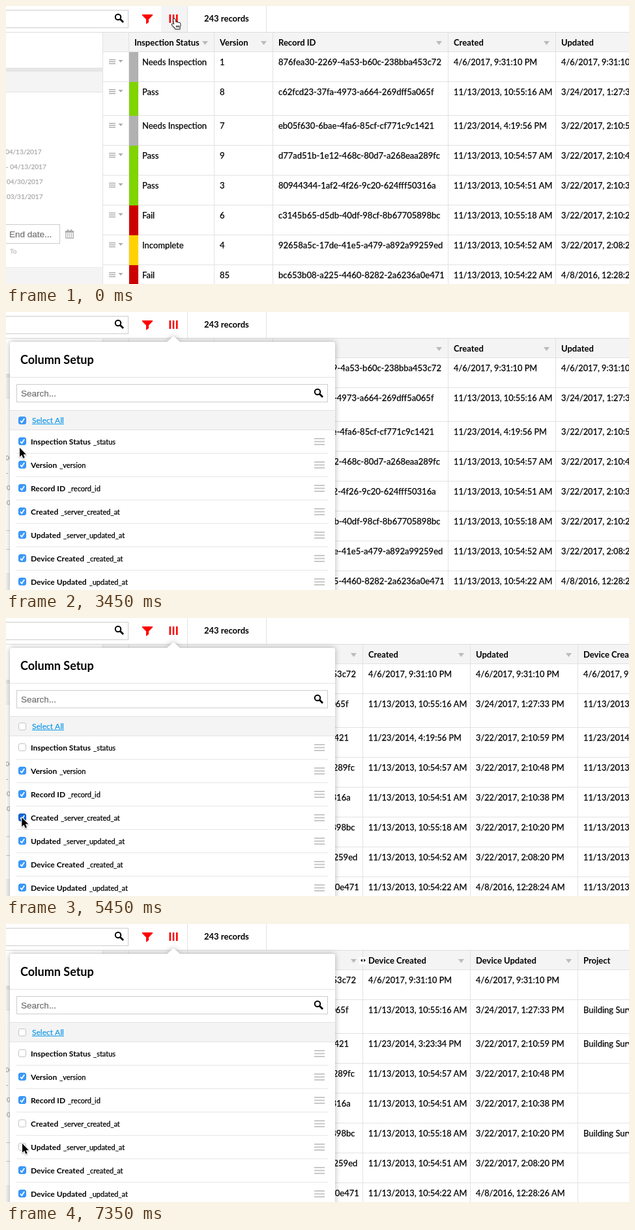
An HTML page with a canvas for the animation above (8 s loop, 956 px wide and 428 px high).

```html
<!DOCTYPE html>
<html lang="en">
<head>
<meta charset="utf-8">
<title>Column setup</title>
<style>
html, body { margin: 0; width: 100%; height: 100%; overflow: hidden; background: #fff; }
canvas { display: block; }
</style>
</head>
<body>
<canvas id="stage" width="956" height="428"></canvas>
<script>
const ctx = document.getElementById('stage').getContext('2d');
const LOOP = 8000, STEP = 118.4;
const LATO = 'Lato, sans-serif', ARIAL = '"Liberation Sans", sans-serif';
const RED = '#f00', LINE = '#e2e2e2', PALE = '#f4f4f4';
const DATE_SIZE = 12.75;

// Table data
const GREY = '#b1b1b1', GREEN = '#80d400', FAIL = '#cc0000', YELLOW = '#ffd200';
const statusColor = { 'Needs Inspection': GREY, Pass: GREEN, Fail: FAIL, Incomplete: YELLOW };
const rowTops = [70, 116, 168, 214, 260, 306, 352, 398];
const pm = '4/6/2017, 9:31:10 PM';
const morning = times => times.split(' ').map(s => `11/13/2013, 10:${s} AM`);
const [a, b, c, d, e, f, g] = morning('55:16 54:57 54:51 55:18 54:52 54:22 54:51');
const updated = [pm, '3/24/2017, 1:27:33 PM', ...['10:59', '10:48', '10:38', '10:20', '08:20']
  .map(s => `3/22/2017, 2:${s} PM`)];
const columns = [
  { name: 'Inspection Status', key: '_status', width: 131, off: 3920,
    cells: ['Needs Inspection', 'Pass', 'Needs Inspection', 'Pass', 'Pass', 'Fail', 'Incomplete', 'Fail'] },
  { name: 'Version', key: '_version', width: 90, cells: ['1', '8', '7', '9', '3', '6', '4', '85'] },
  { name: 'Record ID', key: '_record_id', width: 269, cells: [
    '876fea30-2269-4a53-b60c-238bba453c72', 'c62fcd23-37fa-4973-a664-269dff5a065f',
    'eb05f630-6bae-4fa6-85cf-cf771c9c1421', 'd77ad51b-1e12-468c-80d7-a268eaa289fc',
    '80944344-1af2-4f26-9c20-624fff50316a', 'c3145b65-d5db-40df-98cf-8b67705898bc',
    '92658a5c-17de-41e5-a479-a892a99259ed', 'bc653b08-a225-4460-8282-2a6236a0e471'] },
  { name: 'Created', key: '_server_created_at', width: 165, press: 5450, off: 5570,
    cells: [pm, a, '11/23/2014, 4:19:56 PM', b, c, d, e, f] },
  { name: 'Updated', key: '_server_updated_at', width: 165, press: 7110, off: 7350,
    cells: [...updated, '4/8/2016, 12:28:24 AM'] },
  { name: 'Device Created', key: '_created_at', width: 165,
    cells: [pm, a, '11/23/2014, 3:23:34 PM', b, c, d, g, f] },
  { name: 'Device Updated', key: '_updated_at', width: 165,
    cells: [...updated, '4/8/2016, 12:28:26 AM'] },
  { name: 'Project', width: 165,
    cells: ['', 'Building Survey', 'Building Survey', '', '', 'Building Survey', '', ''] }
];

// Cursor moves: start, number of steps, quadratic path
const moves = [
  { at: 1920, steps: 7, path: [261, 20, 285, 45, 56, 158] },
  { at: 2740, steps: 7, path: [56, 158, 24, 240, 21, 209] },
  { at: 4280, steps: 7, path: [21, 209, 30, 250, 24, 297] },
  { at: 5100, steps: 4, path: [24, 297, 25, 303, 24, 309] },
  { at: 6520, steps: 6, path: [24, 309, 24, 324, 25, 338] }
];

function rect(x, y, w, h, color) {
  ctx.fillStyle = color;
  ctx.fillRect(x, y, w, h);
}

function box(x, y, w, h, color) {
  ctx.strokeStyle = color;
  ctx.lineWidth = 1;
  ctx.strokeRect(x + .5, y + .5, w - 1, h - 1);
}

// The hairline outline gives the text its slightly heavier smoothing
function text(str, x, y, size = 13, color = '#000', weight = 400, family = LATO) {
  ctx.font = `${weight} ${size}px ${family}`;
  ctx.fillStyle = ctx.strokeStyle = color;
  ctx.lineWidth = .25;
  ctx.fillText(str, x, y);
  if (weight === 400) ctx.strokeText(str, x, y);
  return ctx.measureText(str).width;
}

const bold = (str, x, y, size = 13) => text(str, x, y, size, '#000', 700);

function poly(points, color) {
  ctx.beginPath();
  for (let i = 0; i < points.length; i += 2) ctx.lineTo(points[i], points[i + 1]);
  ctx.closePath();
  ctx.fillStyle = color;
  ctx.fill();
}

const caret = (x, y, w, h, color) => poly([x, y, x + w, y, x + w / 2, y + h], color);

function bars(x, y, w, h, gap, color) {
  for (let i = 0; i < 3; i++) rect(x, y + i * gap, w, h, color);
}

function magnifier(x, y) {
  ctx.strokeStyle = '#000';
  ctx.lineWidth = 2;
  ctx.beginPath();
  ctx.arc(x - 2, y - 2, 4.2, 0, 7);
  ctx.stroke();
  ctx.lineWidth = 2.8;
  ctx.beginPath();
  ctx.moveTo(x + 1.5, y + 1.5);
  ctx.lineTo(x + 6, y + 6);
  ctx.stroke();
}

function toolbar(t) {
  rect(0, 0, 956, 40, '#fff');
  if (t < 2040) rect(238, 0, 40, 40, PALE);
  rect(0, 40, 956, 1, '#dcdcdc');
  box(-5, 6, 193, 28, '#ccc');
  magnifier(174, 19);
  poly([209, 13, 225, 13, 225, 14.5, 219, 20.5, 219, 25, 215, 28, 215, 20.5, 209, 14.5], RED);
  for (const x of [250.5, 255.75, 261]) rect(x, 13, 2.5, 13, RED);
  rect(278, 0, 1, 40, LINE);
  rect(399, 0, 1, 40, LINE);
  bold('243 records', 304, 24);
}

function sidebar() {
  rect(0, 95, 148, 6, '#e6e6e6');
  rect(0, 101, 148, 31, PALE);
  rect(0, 132, 148, 1, LINE);
  const dim = '#a8a8a8';
  text('04/13/2017', -1, 228, 10, dim);
  text('- 04/13/2017', 0, 251, 10, dim);
  text('04/30/2017', 1, 274, 10, dim);
  text('03/31/2017', 1, 297, 10, dim);
  box(-5, 336, 88, 30, '#ccc');
  text('End date...', 5, 356, 13.5, '#757575', 400, ARIAL);
  text('To', 6, 381, 10, '#bbb');
  box(91, 346, 13, 12, '#aaa');
  rect(91, 346, 13, 3, '#aaa');
  rect(94, 344, 2, 3, '#aaa');
  rect(99, 344, 2, 3, '#aaa');
  for (let i = 0; i < 9; i++) rect(93 + i % 3 * 3.3, 350 + (i / 3 | 0) * 2.5, 2.4, 1.6, '#bbb');
  rect(0, 402, 148, 26, PALE);
  rect(0, 402, 148, 1, '#ececec');
}

function table(t) {
  rect(148, 41, 808, 29, PALE);
  for (const y of rowTops) {
    rect(148, y, 808, 1, LINE);
    bars(158, y + 12, 10, 1.4, 3, '#aaa');
    caret(172.5, y + 13, 7, 4, '#aaa');
  }
  rect(148, 41, 1, 387, LINE);
  let x = 188;
  for (const col of columns) {
    if (t >= col.off) continue;
    rect(x, 41, 1, 387, LINE);
    bold(col.name, x + 9, 61);
    caret(x + col.width - 18, 54, 9, 6, '#bbb');
    col.cells.forEach((cell, i) => {
      const y = rowTops[i], color = statusColor[cell];
      if (color) rect(x + 1, y + 1, 14, (rowTops[i + 1] || 444) - y, color);
      text(cell, x + (color ? 21 : 9), y + 21, cell.includes('/') ? DATE_SIZE : 13);
    });
    x += col.width;
  }
  if (t >= 5570) {
    rect(542, 51, 11, 11, '#fff');
    poly([547, 53.5, 547, 58.5, 544, 56], '#000');
    poly([549, 53.5, 549, 58.5, 552, 56], '#000');
  }
}

function checkbox(y, checked, pressed) {
  ctx.beginPath();
  ctx.roundRect(19.5, y - 5.5, 11, 11, 2.5);
  ctx.lineWidth = 1;
  ctx.fillStyle = checked ? (pressed ? '#1268d6' : '#3b99fc') : '#fff';
  ctx.strokeStyle = checked ? (pressed ? '#0d57b8' : '#318ff0') : '#c4c4c4';
  ctx.fill();
  ctx.stroke();
  if (!checked) return;
  ctx.beginPath();
  ctx.moveTo(22, y + .5);
  ctx.lineTo(24.2, y + 3);
  ctx.lineTo(28.2, y - 3);
  ctx.strokeStyle = '#fff';
  ctx.lineWidth = 1.7;
  ctx.stroke();
}

function popup(t) {
  ctx.save();
  ctx.shadowColor = 'rgba(0,0,0,.3)';
  ctx.shadowBlur = 9;
  ctx.beginPath();
  ctx.roundRect(6, 46, 499, 420, 3);
  ctx.moveTo(247, 46);
  ctx.lineTo(257, 37);
  ctx.lineTo(267, 46);
  ctx.fillStyle = '#fff';
  ctx.fill();
  ctx.restore();

  bold('Column Setup', 22, 80, 18);
  rect(6, 100, 499, 1, LINE);
  box(16, 111, 478, 28, '#ccc');
  text('Search...', 23, 130, 13.5, '#757575', 400, ARIAL);
  magnifier(480, 125);
  rect(6, 151, 499, 31, LINE);
  rect(6, 152, 499, 29, PALE);
  checkbox(167, t < 3920);
  const blue = '#1a9be8';
  rect(40, 172, text('Select All', 40, 171, 12, blue), 1, blue);

  columns.slice(0, 7).forEach((col, i) => {
    const y = 199 + i * 36;
    checkbox(y, !(t >= col.off), t >= col.press);
    const w = bold(col.name, 38, y + 5, 12);
    text(col.key, 38 + w + 4, y + 5, 11);
    bars(473, y - 5, 16, 2, 4.5, '#c8c8c8');
    rect(16, y + 18, 478, 1, '#e6e6e6');
  });
}

const arrow = new Path2D('M0 0V14L3.2 11L5.3 16L7.7 15L5.6 10.2H10Z');
const hand = new Path2D('M4.2 9.5L2.8 2.6Q2.6 .8 4 .7Q5.2 .6 5.6 2.2L6.7 6.2Q8.2 5.2 9 6.5' +
  'Q10.4 5.6 11.2 7Q13 6.4 13.4 8.4Q14 11.5 12.6 13.5V16.3H6.3Q5.3 14 2.6 12' +
  'Q.2 10 .8 9Q1.8 8 4.2 9.5Z');
const fingers = new Path2D('M7.5 11v3M9.5 11v3M11.3 11v3');

function drawCursor(shape, x, y, line) {
  const [fill, edge] = shape === arrow ? ['#000', '#fff'] : ['#fff', '#000'];
  ctx.save();
  ctx.translate(x, y);
  ctx.lineJoin = 'round';
  ctx.shadowColor = 'rgba(0,0,0,.3)';
  ctx.shadowBlur = 2;
  ctx.shadowOffsetY = 1;
  ctx.lineWidth = line;
  ctx.strokeStyle = edge;
  ctx.stroke(shape);
  ctx.shadowColor = 'transparent';
  ctx.fillStyle = fill;
  ctx.fill(shape);
  ctx.lineWidth = 1;
  if (shape === hand) ctx.stroke(fingers);
  ctx.restore();
}

function cursor(t) {
  if (t < 1920) return drawCursor(hand, 254, 19, 1.6);
  if (t >= 3560 && t < 4280) return drawCursor(hand, 19, 207, 1.6);
  const { at, steps, path: [x0, y0, x1, y1, x2, y2] } = moves.findLast(m => t >= m.at);
  const p = Math.min(1, (Math.floor((t - at) / STEP + .02) + 1) / steps);
  const s = p * p * (3 - 2 * p);
  const curve = (from, via, to) => from * (1 - s) ** 2 + 2 * via * s * (1 - s) + to * s * s;
  drawCursor(arrow, curve(x0, x1, x2), curve(y0, y1, y2), 2);
}

function draw(now) {
  const t = now % LOOP;
  rect(0, 0, 956, 428, '#fff');
  sidebar();
  table(t);
  toolbar(t);
  if (t >= 1200) popup(t);
  cursor(t);
  requestAnimationFrame(draw);
}

requestAnimationFrame(draw);
</script>
</body>
</html>
```
